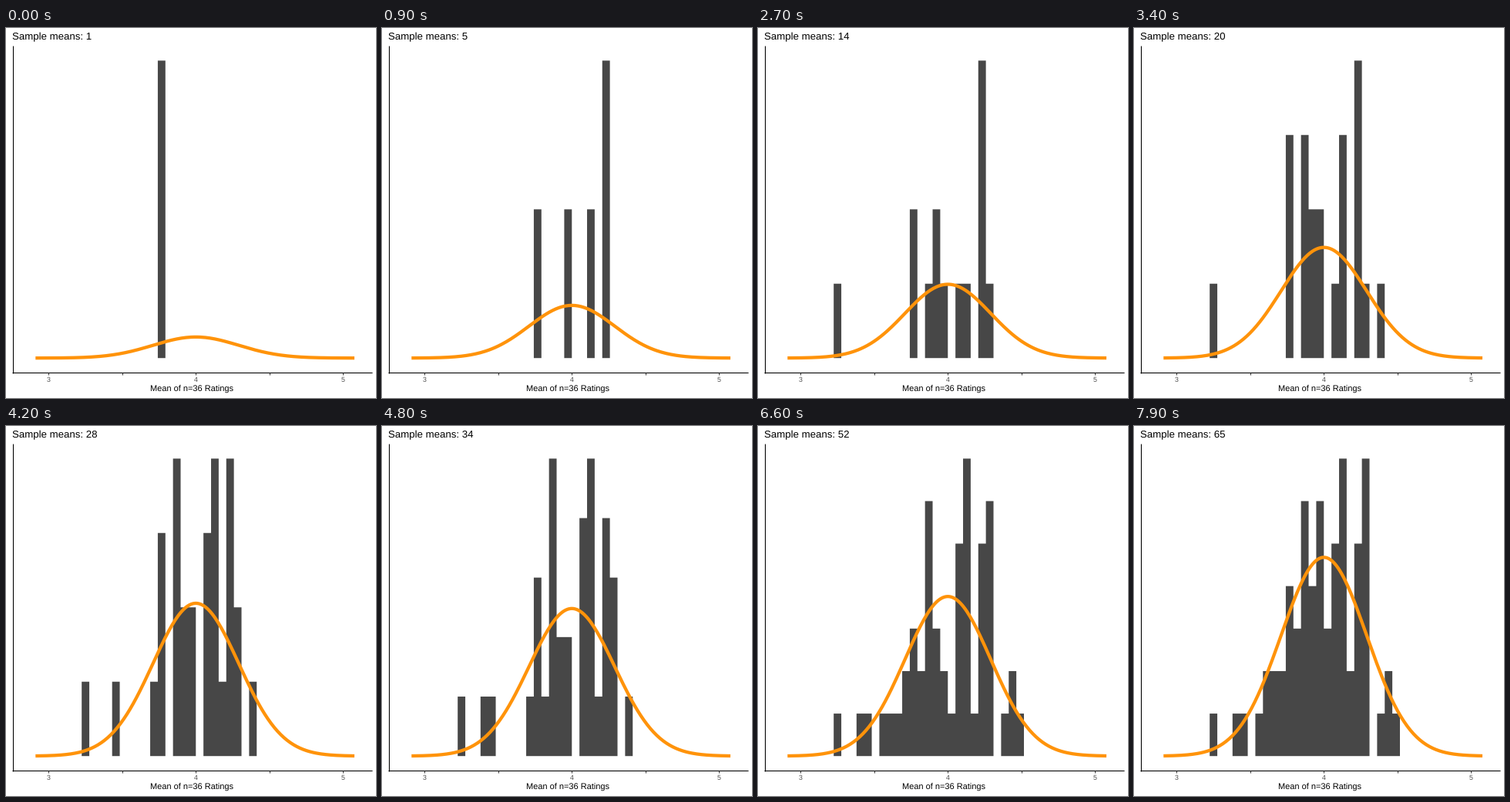
A matplotlib script that plays this animation: 480 px wide and 480 px high, repeating every 8 s.

```python
import numpy as np
import matplotlib.pyplot as plt
from matplotlib.animation import FuncAnimation

SIZE, DPI = 480, 96
PT = 72 / DPI                        # one pixel in points
BASE, TOP = 428.2, 42.3              # plot floor and tallest bar
LEFT, RIGHT, FLOOR, ROOF = 8.5, 474.5, 447.4, 23
MID, UNIT = 246.3, 191               # pixel of rating 4, pixels per rating
BIN0, BIN_W, BINS = 98.2, 9.872, 25
SIGMA = 0.291 * UNIT
FRAMES, STEP = 80, 100
LAST_PAUSED = 26                     # up to here the label catches up with the bars

# histogram bin hit by each sample mean, in order of arrival
HITS = [
    10, 19, 14, 19, 17, 10, 13, 19, 20, 16,
    12, 19, 13, 0, 12, 17, 22, 10, 12, 14, 17,
    16, 4, 20, 12, 18, 16, 9, 17,
    12, 20, 3, 16, 17, 11, 20, 9, 15, 12, 24, 11, 20,
    23, 17, 7, 16, 20, 17, 6, 13, 19, 8, 23,
    14, 15, 8, 14, 20, 10, 18, 14, 7, 13, 15, 14, 11,
]

plt.rcParams["font.family"] = "Liberation Sans"
plt.rcParams["text.hinting"] = "none"

fig = plt.figure(figsize=(SIZE / DPI, SIZE / DPI), dpi=DPI, facecolor="white")
ax = fig.add_axes([0, 0, 1, 1])
ax.set_xlim(0, SIZE)
ax.set_ylim(SIZE, 0)
ax.axis("off")


def label(x, y, text, size, color="black", ha="center"):
    return ax.text(x, y, text, fontsize=size * PT, color=color, ha=ha, va="baseline")


def stroke(xs, ys, color="black", width=1.07, **kw):
    return ax.plot(xs, ys, color=color, lw=width * PT, solid_capstyle="butt", **kw)[0]


edges = BIN0 + BIN_W * np.arange(BINS + 1)
bars = ax.stairs(np.full(BINS, BASE), edges, baseline=BASE, fill=True,
                 color="#474747", lw=0, zorder=2)
bars.set_snap(False)

curve_x = np.linspace(38.3, 452, 200)
bell = np.exp(-0.5 * ((curve_x - MID) / SIGMA) ** 2)
density = BIN_W / (SIGMA * np.sqrt(2 * np.pi)) * bell
curve = stroke(curve_x, np.full_like(curve_x, BASE), "#FF930A", 4.27, zorder=3)

stroke([LEFT, LEFT], [ROOF, FLOOR + 0.5])
stroke([LEFT - 0.5, RIGHT], [FLOOR, FLOOR])
for rating in (3, 3.5, 4, 4.5, 5):
    x = MID + (rating - 4) * UNIT
    stroke([x, x], [FLOOR, FLOOR + 2.75], "#333333")
    if rating == int(rating):
        label(x, 459, str(int(rating)), 8.8, "#4D4D4D")
label((LEFT + RIGHT) / 2 - 0.3, 472, "Mean of n=36 Ratings", 11)
title = label(8, 15, "", 13.2, ha="left")


def progress(frame):
    """Return the number of samples drawn and the number in the title."""
    step = max(0, frame - 1)
    if step <= LAST_PAUSED:
        return 1 + (step + 1) // 2, 1 + step // 2
    n = step - LAST_PAUSED // 2 + 1
    return n, n - 1


def draw(frame):
    n, shown = progress(frame)
    counts = np.bincount(HITS[:n], minlength=BINS)
    scale = (BASE - TOP) / counts.max()
    bars.set_data(BASE - counts * scale, edges, BASE)
    curve.set_ydata(BASE - n * density * scale)
    title.set_text(f"Sample means: {shown}")
    return bars, curve, title


anim = FuncAnimation(fig, draw, frames=FRAMES, interval=STEP,
                     repeat=True, repeat_delay=0, blit=False)
plt.show()
```
